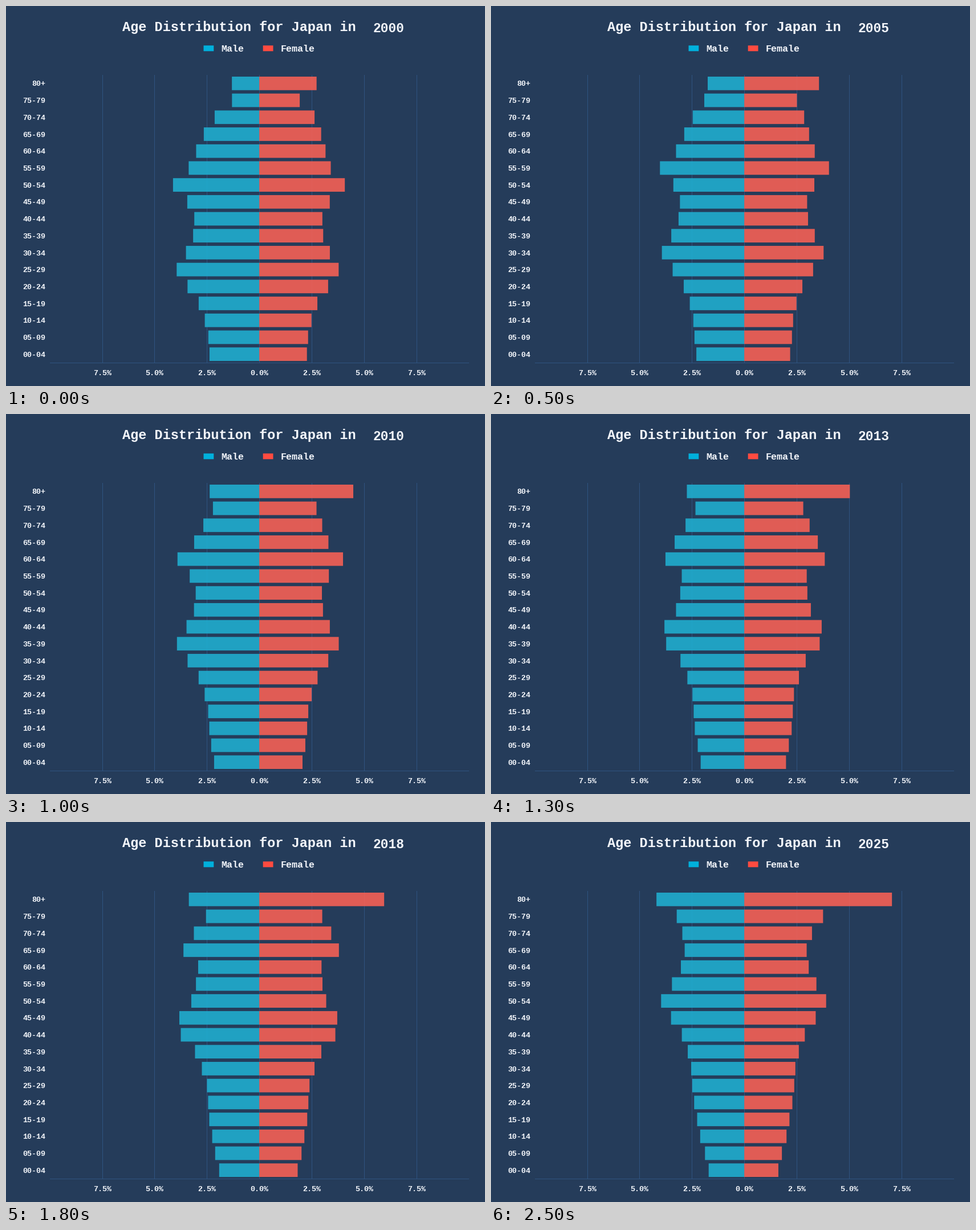
A matplotlib script for the animation above (2.6 s loop, 840 px wide and 667 px high).

```python
import numpy as np
import matplotlib.pyplot as plt
from matplotlib.animation import FuncAnimation
from matplotlib.patches import Rectangle

W, H, DPI = 840, 667, 100
BACK, GRID, TEXT = "#253c5a", "#2f5380", "#f2f5fa"
ZERO, TICK = 444.15, 91.87
LEFT, RIGHT, TOP, BOTTOM = 77, 812, 121, 626
ROWS, START, END = 17, 2000, 2025
PITCH = (BOTTOM - TOP) / ROWS


def bump(x, middle, spread):
    return np.exp(-((x - middle) / spread) ** 2 / 2)


def cohort_size(birth):
    """Bar length of a birth cohort: a slow rise and fall with two baby booms."""
    base = np.interp(birth,
                     [1925, 1930, 1935, 1945, 1953, 1958, 1970, 1985, 1993, 2003, 2015, 2020, 2025],
                     [71, 104, 120, 139.5, 131.5, 122.5, 123, 110, 95, 90.5, 77.5, 69, 62.5])
    return base + 39 * bump(birth, 1951.3, 2.2) + 35 * bump(birth, 1975.5, 4)


def shrink(year, band, loss):
    """Share kept by a cohort: deaths grow with age, the total population falls."""
    progress = (year - START) / (END - START)
    return np.exp(-.05 * (1 - progress ** 2.5) - loss * np.exp((band - 15) / 2.6))


def oldest(year, lengths):
    return np.interp(year, [2000, 2003, 2018, 2025], lengths)


def lengths(year):
    """Male and female bar lengths, youngest band first."""
    band = np.arange(ROWS - 1)
    birth = year - 5 * band
    size = cohort_size(birth)
    female_ratio = .957 + .27 * np.exp((1925 - birth) / 7)
    male = size * shrink(year, band, .345)
    female = size * female_ratio * shrink(year, band, .155)
    return (np.append(male, oldest(year, [48, 55, 123.5, 154])),
            np.append(female, oldest(year, [100.5, 117.5, 219, 259])))


fig = plt.figure(figsize=(W / DPI, H / DPI), dpi=DPI, facecolor=BACK)
ax = fig.add_axes([0, 0, 1, 1])
ax.set(xlim=(0, W), ylim=(H, 0))
ax.axis("off")


def write(x, y, text, size, align="left"):
    return ax.text(x, y, text, size=size * 72 / DPI, ha=align, va="baseline", color=TEXT,
                   family="Liberation Mono", weight="bold")


def box(x, y, width, height, color, alpha=1):
    return ax.add_patch(Rectangle((x, y), width, height, color=color, alpha=alpha,
                                  lw=0, snap=False))


write(203.5, 44, "Age Distribution for Japan in", 23.6)
year_text = write(643.5, 45.5, str(START), 22.9)
for x, name, color in ((346.5, "Male", "#00b0dc"), (450.7, "Female", "#ff4b40")):
    box(x, 69.3, 17.8, 10, color)
    write(x + 30.5, 80, name, 16.6)

for step in range(-3, 4):
    x = round(ZERO + step * TICK)
    box(x, TOP, 1, BOTTOM - TOP, GRID)
    write(x, 648.5, f"{abs(step) * 2.5:.1f}%", 13.4, "center")
box(LEFT, BOTTOM, RIGHT - LEFT, 1, GRID)

male_bars, female_bars = [], []
for row in range(ROWS):
    middle = BOTTOM - PITCH * (row + .5)
    label = f"{row * 5:02d}-{row * 5 + 4:02d}" if row < 16 else "80+"
    write(69, middle + 4.6, label, 13.4, "right")
    top, height = middle - .4 * PITCH, .8 * PITCH
    male_bars.append(box(ZERO, top, 0, height, "#20b1d2", .87))
    female_bars.append(box(ZERO, top, 0, height, "#fd6155", .87))


def draw(i):
    year = START + i
    year_text.set_text(str(year))
    for male_bar, female_bar, male, female in zip(male_bars, female_bars, *lengths(year)):
        male_bar.set_width(-male)
        female_bar.set_width(female)
    return [year_text, *male_bars, *female_bars]


animation = FuncAnimation(fig, draw, frames=END - START + 1, interval=100,
                          repeat=True, repeat_delay=0)
plt.show()
```
